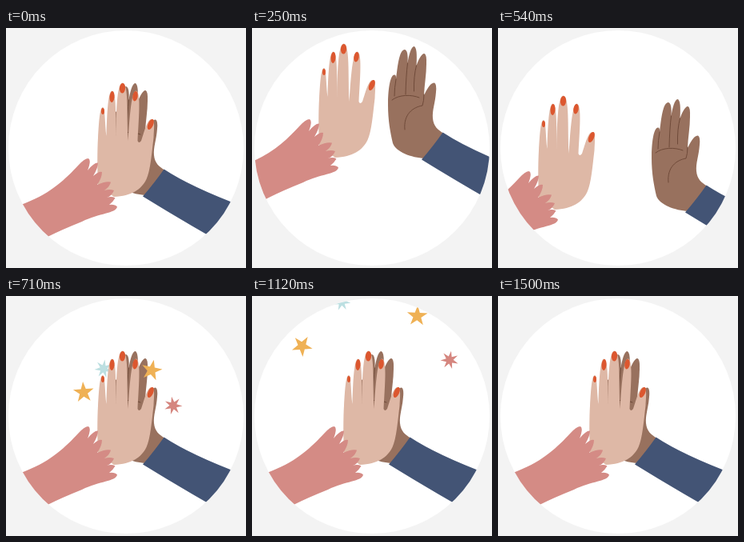
An HTML page that plays this animation: 300 by 300 pixels, repeating every 2040 ms.

```html
<!DOCTYPE html>
<html>
<head>
<meta charset="utf-8">
<title>High five</title>
<style>
  html, body { margin: 0; height: 100%; overflow: hidden; background: #f3f3f3; }
  svg { display: block; width: 100vw; height: 100vh; }
</style>
</head>
<body>
<svg viewBox="0 0 300 300">
  <clipPath id="disc"><circle cx="150" cy="150" r="147"/></clipPath>
  <circle cx="150" cy="150" r="147" fill="#fff"/>
  <g clip-path="url(#disc)">
    <g id="right"><g transform="translate(-69 22)">
      <path fill="#98715e" d="M244 187C227 186 208 179 204 168C201 155 198 140 198 120C198 104 200 83 206 82.500Q208.500 82.500 208 88
        C210 72 212 51 219 51Q223.500 52 222.500 68C224 58 227 47 230.500 47Q235 48 233.500 71
        C236 64 240 55.500 243.500 56Q246.500 57 246 69C246 82 243.500 95 243 108
        C246 102 251 92 256 92.500Q259 94 258 104C257 118 253 127 254 137C255 147 260 151 268 156L250 187Z"/>
      <path fill="none" stroke="#6f4a39" stroke-linecap="round" d="M203 114C212 107 227 107 237 111M219 151C217 132 229 123 241 121Q243 115 243 107
        M208 88Q206 99 206 109M222.500 68Q220.500 84 220 107M233.500 71Q230 84 230.500 103"/>
      <path fill="#435475" d="M266.500 154.500Q308 182 400 213.500L370 264.500Q300 225.500 240 188.500Q255 171 266.500 154.500Z"/>
    </g></g>
    <g id="stars"></g>
    <g id="left"><g transform="translate(65 32)">
      <path fill="#deb8a6" d="M50 165C49 145 49 122 50 105C51 88 52 67 56 67C59 67 58.500 88 60.500 103
        C61 84 62 46.500 67.500 46.500C73 46.500 72.200 80 72.500 105
        C72.500 76 73.500 36.500 80.500 36.500C88.500 36.500 86 76 87.500 109
        C89 90 91 46.500 97.500 46.500C104 47 101 80 99.500 109Q101 113 104 109
        C107 101 111 82 117 82C121.500 83 120 93 119.500 105C117 126 115.500 146 110.500 157C104 170 92 178 70 179Z"/>
      <g fill="#dc572f">
        <ellipse cx="56" cy="72" rx="2" ry="4"/>
        <ellipse cx="67.500" cy="54" rx="3" ry="7" transform="rotate(4 67.500 54)"/>
        <ellipse cx="80.500" cy="43.300" rx="3.600" ry="6.300" transform="rotate(4 80.500 43.300)"/>
        <ellipse cx="96.500" cy="53.300" rx="3.200" ry="6.300" transform="rotate(9 96.500 53.300)"/>
        <ellipse cx="115.800" cy="88.500" rx="3.300" ry="7" transform="rotate(23 115.800 88.500)"/>
      </g>
      <path fill="#d48b85" d="M-95 204Q-55 193 -40 186.500C-8 174 10 156 25 140Q33 131 38 131Q42 133 37 146
        Q45 136 50 136.500Q50 143 44 153Q51 147 55 148Q55 155 49 164Q59 159 66 160.500Q65 166 58 171
        Q65 169 70 171Q67 178 61 180Q67 178 71.500 180.500Q69 185 64 189Q71 188 74 191.500
        C72 200 52 199 30 210Q5 220 -12 228.500L-70 258Z"/>
    </g></g>
  </g>
</svg>
<script>
const LOOP = 2040, FRAME = 1000 / 24, HIT = 17, GONE = 36;
const byId = id => document.getElementById(id);

// Hand paths: [step, x, y]
const leftPath = [[0, 0, 0], [2, 0, -21], [4, -7, -39.5], [6, -31, -49], [9, -65, -32], [13, -64, 16], [15, -34, 24], [17, 0, 0]];
const rightPath = [[0, 0, 0], [2, 5, -22], [4, 17, -40.5], [6, 41, -46], [9, 69, -22], [13, 63, 20], [15, 34, 24], [17, 0, 0]];

// Smooth curve through the keys, at rest at both ends
function along(keys, step) {
  const last = keys.length - 1;
  if (step >= keys[last][0]) return [0, 0];
  const k = keys.findIndex(key => key[0] > step) - 1;
  const a = keys[k], b = keys[k + 1], span = b[0] - a[0], u = (step - a[0]) / span;
  const slope = (i, c) => i === 0 || i === last ? 0
    : (keys[i + 1][c] - keys[i - 1][c]) / (keys[i + 1][0] - keys[i - 1][0]);
  return [1, 2].map(c => {
    const ease = u * u * (3 - 2 * u);
    return a[c] + (b[c] - a[c]) * ease
      + span * u * (1 - u) * ((1 - u) * slope(k, c) - u * slope(k + 1, c));
  });
}

function starPoints(count, outer, inner) {
  return Array.from({ length: count * 2 }, (_, i) => {
    const r = i % 2 ? inner : outer, a = i * Math.PI / count;
    return [r * Math.sin(a), -r * Math.cos(a)].map(v => v.toFixed(2)).join();
  }).join(" ");
}

const stars = [
  { color: "#efb155", shape: [5, 13.5, 5.2], from: [97, 120.5], move: [-34.5, -58], angle: -4, turn: -36 },
  { color: "#efb155", shape: [5, 13.5, 5.2], from: [182, 93], move: [24.5, -68], angle: 12, turn: -9 },
  { color: "#bcdfe1", shape: [7, 11.5, 4.6], from: [122, 91], move: [-10, -84], angle: 8, turn: -12 },
  { color: "#d5867f", shape: [7, 11.5, 4.6], from: [209, 137], move: [38, -57], angle: -10, turn: 20 }
];
for (const star of stars) {
  star.node = document.createElementNS("http://www.w3.org/2000/svg", "polygon");
  star.node.setAttribute("points", starPoints(...star.shape));
  star.node.setAttribute("fill", star.color);
  byId("stars").append(star.node);
}

function draw(now) {
  const step = Math.floor((now % LOOP + 6) / FRAME);
  byId("left").setAttribute("transform", `translate(${along(leftPath, step)})`);
  byId("right").setAttribute("transform", `translate(${along(rightPath, step)})`);

  const shown = step >= HIT && step < GONE;
  byId("stars").setAttribute("opacity", shown ? Math.min(1, (GONE - step) / 7) : 0);
  const flight = (1 - ((GONE - step) / 19) ** 2) / 0.776;
  for (const { node, from, move, angle, turn } of stars) {
    const [x, y] = from.map((v, i) => v + move[i] * flight);
    node.setAttribute("transform", `translate(${x} ${y}) rotate(${angle + turn * flight})`);
  }
}

const start = performance.now();
function tick() {
  draw(performance.now() - start);
  requestAnimationFrame(tick);
}
tick();
</script>
</body>
</html>
```
